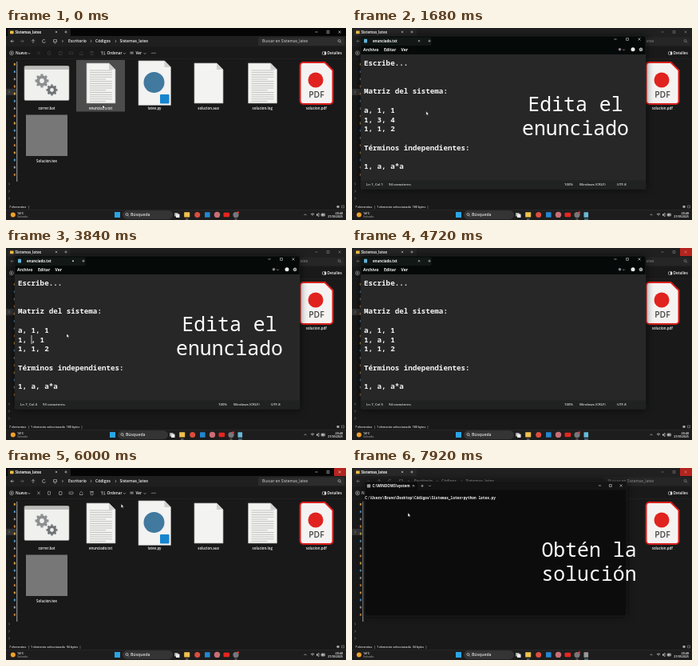
Recreate the animation shown at these times as an HTML page with a canvas. Size 426 by 240 pixels, loop 8000 ms.

```html
<!DOCTYPE html>
<html lang="es">
<head>
<meta charset="utf-8">
<title>Sistemas_latex</title>
<style>
html, body { margin: 0; width: 100%; height: 100%; overflow: hidden; background: #191919; }
canvas { display: block; width: 100vw; height: 100vh; }
</style>
</head>
<body>
<canvas id="stage"></canvas>
<script>
const W = 426, H = 240, LOOP = 8000;
const UI = '"Open Sans", "Noto Sans", sans-serif';
const MONO = '"Noto Sans Mono", "DejaVu Sans Mono", monospace';
const canvas = document.getElementById('stage');
const c = canvas.getContext('2d');

// time, line being edited, caret column
const EDITS = [
  [0, '1, 3, 4', 0], [2150, '1, 3, 4', 8], [2600, '1, 3, ', 7],
  [3000, '1, 3, 1', 8], [3160, '1, 3, 1', 7], [3280, '1, 3, 1', 6],
  [3400, '1, 3, 1', 5], [3600, '1, , 1', 4], [3850, '1, a, 1', 5]
];
// time, x, y of the pointer
const POINTER = [
  [0, 121, 96], [750, 121, 96], [1080, 104, 102], [1400, 104, 102],
  [2050, 76, 107], [4150, 76, 107], [4600, 428, 2], [5400, 428, 2],
  [6250, 70, 56], [8000, 70, 56]
];

const clamp = v => Math.max(0, Math.min(1, v));
const ramp = (t, a, b) => clamp((t - a) / (b - a));
const ease = p => p * p * (3 - 2 * p);

function rect(x, y, w, h, fill, r = 0) {
  c.fillStyle = fill;
  c.beginPath();
  r ? c.roundRect(x, y, w, h, r) : c.rect(x, y, w, h);
  c.fill();
}
function disc(x, y, r, fill) {
  c.fillStyle = fill;
  c.beginPath();
  c.arc(x, y, r, 0, 7);
  c.fill();
}
function shape(points, fill) {
  c.fillStyle = fill;
  c.beginPath();
  points.forEach(p => c.lineTo(...p));
  c.closePath();
  c.fill();
}
function line(points, color = '#ddd', width = .6) {
  c.strokeStyle = color;
  c.lineWidth = width;
  c.beginPath();
  points.forEach(p => c.lineTo(...p));
  c.stroke();
}
function frame(x, y, w, h, color, width = .6, r = 0) {
  c.strokeStyle = color;
  c.lineWidth = width;
  c.beginPath();
  c.roundRect(x, y, w, h, r);
  c.stroke();
}
// y is the vertical middle of the lower-case letters
function text(s, x, y, size = 5, o = {}) {
  c.font = `${o.weight || 600} ${size}px ${o.font || UI}`;
  c.textAlign = o.align || 'left';
  c.fillStyle = o.color || '#f4f4f4';
  c.fillText(s, x, y + size * .3);
}
function faded(alpha, draw) {
  if (alpha <= 0) return;
  c.save();
  c.globalAlpha *= alpha;
  draw();
  c.restore();
}
const cross = (x, y, r = 1.5, color) => {
  line([[x - r, y - r], [x + r, y + r]], color);
  line([[x + r, y - r], [x - r, y + r]], color);
};
const plus = (x, y, r = 1.6, color) => {
  line([[x - r, y], [x + r, y]], color);
  line([[x, y - r], [x, y + r]], color);
};
const chevron = (x, y, color) => line([[x - .8, y - 1.3], [x + .7, y], [x - .8, y + 1.3]], color);
const down = (x, y, color) => line([[x - 1.3, y - .6], [x, y + .7], [x + 1.3, y - .6]], color);
const controls = (x, y, step) => {
  line([[x - 1.6, y], [x + 1.6, y]]);
  frame(x + step - 1.4, y - 1.4, 2.8, 2.8, '#ddd');
  cross(x + 2 * step, y);
};

function page(x, y, w, h, rows) {
  const f = 8;
  const outline = [[x, y], [x + w - f, y], [x + w, y + f], [x + w, y + h], [x, y + h]];
  shape(outline, '#f3f3f1');
  line([...outline, [x, y]], '#a9a9a9', .7);
  shape([[x + w - f, y], [x + w - f, y + f], [x + w, y + f]], '#cfcfcf');
  for (let i = 0; i < rows; i++) {
    const ly = y + 9 + i * 2.75;
    line([[x + 4, ly], [x + w - (i % 5 === 4 ? 12 : 4), ly]], '#bdbdbd', .9);
  }
}
function gear(x, y, r, color) {
  for (let i = 0; i < 8; i++) {
    const a = i * Math.PI / 4, dx = Math.cos(a), dy = Math.sin(a);
    line([[x + dx * r * .7, y + dy * r * .7], [x + dx * r, y + dy * r]], color, r * .36);
  }
  c.beginPath();
  c.lineWidth = r * .46;
  c.arc(x, y, r * .57, 0, 7);
  c.stroke();
}
function pdf(x, y, w, h) {
  const f = 10, r = 4;
  c.beginPath();
  c.moveTo(x + r, y);
  c.lineTo(x + w - f, y);
  c.lineTo(x + w, y + f);
  c.arcTo(x + w, y + h, x, y + h, r);
  c.arcTo(x, y + h, x, y, r);
  c.arcTo(x, y, x + w, y, r);
  c.closePath();
  c.fillStyle = '#f5f3f2';
  c.strokeStyle = '#d81f1b';
  c.lineWidth = 2;
  c.fill();
  c.stroke();
  disc(x + 19.5, y + 22, 9.5, '#e0231e');
  text('PDF', x + 20.5, y + 40.5, 10.4, { align: 'center', color: '#444' });
}

function files(t) {
  if (t < 5900) rect(88, 40, 61, 64.5, t < 800 ? '#4c4c4c' : '#343434');
  if (t >= 6150) rect(21, 40, 60.5, 64.5, t < 6900 ? '#3b3b3b' : '#343434');

  rect(23, 47.5, 56, 43, '#f0f0ee', 1.5);
  rect(23, 47.5, 56, 4.5, '#bcbcba', 1.5);
  frame(23, 47.5, 56, 43, '#999', .7, 1.5);
  gear(45, 66, 8.5, '#8d8f91');
  gear(57.5, 77.5, 7, '#707376');

  page(101, 44, 36, 50, 15);
  page(166, 41, 40.5, 55.5, 0);
  disc(185.5, 68, 13, '#41799f');
  rect(193, 83, 11.5, 11.5, '#1685cf', 1);
  page(236, 44, 36, 50, 0);
  page(303.5, 44, 36, 50, 15);
  pdf(368.5, 43, 41, 52);
  rect(25, 108.5, 52, 51.5, '#777');

  ['correr.bat', 'enunciado.txt', 'latex.py', 'solucion.aux', 'solucion.log', 'solucion.pdf']
    .forEach((s, i) => text(s, 51 + i * 67.55, 100.5, 4.4, { align: 'center' }));
  text('Solucion.tex', 51, 166.5, 4.4, { align: 'center' });
}

function explorer(t) {
  const active = t < 1000 || (t > 5050 && t < 7150);
  const picked = t >= 800;
  rect(0, 0, W, H, '#191919');
  rect(0, 0, W, 10, active ? '#050505' : '#202020');
  rect(2, 1, 79, 9, active ? '#1f1f1f' : '#282828', 1.5);
  rect(0, 10, W, 13.5, '#1f1f1f');
  rect(5, 3.4, 4.6, 3.8, '#efbd45', .5);
  text('Sistemas_latex', 11.6, 5.3, 4.4, { weight: 700 });
  cross(63, 5, 1.2);
  plus(75, 5);
  if (t >= 4550) rect(411, 0, 15, 10, '#b5231f');
  faded(active ? 1 : .55, () => controls(389, 5, 14.5));

  faded(active ? 1 : .6, () => {
    line([[10, 16.5], [6, 16.5], [8, 14.5]]);
    line([[6, 16.5], [8, 18.5]]);
    line([[18, 16.5], [22, 16.5], [20, 14.5]], '#777');
    line([[22, 16.5], [20, 18.5]], '#777');
    line([[34, 19], [34, 14.5], [32, 16.5]]);
    line([[34, 14.5], [36, 16.5]]);
    c.beginPath();
    c.arc(47.5, 16.5, 2, .3, 5.6);
    c.stroke();
    frame(59.5, 14.7, 4, 2.8, '#ddd');
    line([[60.5, 19], [62.5, 19]]);
    [71, 106.5, 137.5].forEach(x => chevron(x, 16.5));
    text('Escritorio', 78, 16.5);
    text('Códigos', 112, 16.5);
    text('Sistemas_latex', 142.5, 16.5);
    rect(316, 11.5, 108, 10.5, '#2c2c2c', 1.5);
    text('Buscar en Sistemas_latex', 321, 16.5, 4.9, { color: '#ddd', weight: 500 });
    c.strokeStyle = '#ccc';
    c.lineWidth = .6;
    c.beginPath();
    c.arc(417.5, 16, 1.5, 0, 7);
    c.stroke();
    line([[418.5, 17], [420, 18.5]], '#ccc');
  });

  frame(4.5, 28.8, 5, 5, '#ccc', .6, 2.5);
  plus(7, 31.3, 1.3);
  text('Nuevo', 12, 31.8, 4.7);
  down(29, 31.8);
  faded(picked ? .85 : .22, () => {
    cross(41, 31.3, 1.8);
    frame(52.5, 29.3, 3, 4, '#ddd', .6, .5);
    frame(66.5, 29.5, 3.5, 4, '#ddd', .6, .5);
    frame(79, 30, 5, 2.6, '#ddd', .6, .5);
    line([[92.5, 31.5], [92.5, 33.5], [96, 33.5], [96, 31.5]]);
    line([[92.5, 31], [94.3, 29.3], [96, 31]]);
    frame(106, 30, 3, 3.6, '#ddd', .6, .5);
    line([[105, 29.6], [110, 29.6]]);
  });
  line([[120.5, 33.5], [120.5, 29], [119, 30.5]]);
  line([[123, 29], [123, 33.5], [124.5, 32]]);
  text('Ordenar', 126.5, 31.8, 4.7);
  down(148.5, 31.8);
  rect(155.5, 29.8, 4.2, .7, '#ddd');
  rect(155.5, 31.6, 4.2, .7, '#ddd');
  text('Ver', 162.5, 31.8, 4.7);
  down(174, 31.8);
  [183, 185, 187].forEach(x => disc(x, 31.3, .55, '#ddd'));
  frame(396.5, 29.8, 4.5, 3.4, '#ddd', .6, .5);
  rect(399, 29.8, 2, 3.4, '#ddd');
  text('Detalles', 402.5, 31.8, 4.7);
  rect(0, 38.5, W, .5, '#2b2b2b');

  rect(0, 76, 13, 8, '#343434');
  const dots = ['#d8a640', '#4b96c8', '#999', '#c98138'];
  for (let i = 0; i < 16; i++) rect(9.8, 44 + i * 9.2, 2, 2.8, dots[i % 4], .5);
  [80, 195, 204, 213].forEach(y => chevron(4, y, '#888'));
  rect(13, 42, 1.3, 150, '#858585');

  files(t);

  const bytes = t >= 6900 ? '34' : t >= 5050 ? '94' : '180';
  text('7 elementos  |' + (picked ? `  1 elemento seleccionado  ${bytes} bytes  |` : ''),
    4, 223.5, 3.6, { color: '#ddd' });
  rect(414.5, 222, 3, 2.8, '#aaa');
  frame(420.5, 222, 3, 2.8, '#aaa', .5);
}

function taskbar(t) {
  const shift = 6 * (ease(ramp(t, 980, 1130)) - ease(ramp(t, 5300, 5480)) + ease(ramp(t, 7180, 7350)));
  rect(0, 227.5, W, 12.5, '#1d1d1d');
  rect(0, 227.3, W, .4, '#333');
  disc(8.8, 233.5, 3, '#f0a02c');
  text('14°C', 14, 231.5, 3.8);
  text('Soleado', 14, 236, 3.6, { color: '#aaa', weight: 400 });

  c.save();
  c.translate(-shift, 0);
  rect(136, 230, 7, 7, '#2aa5e6');
  rect(146.5, 228.7, 62, 9.8, '#343434', 4.9);
  frame(146.5, 228.7, 62, 9.8, '#4a4a4a', .4, 4.9);
  c.strokeStyle = '#ddd';
  c.lineWidth = .7;
  c.beginPath();
  c.arc(151.5, 233, 1.5, 0, 7);
  c.stroke();
  line([[152.6, 234.2], [154, 235.6]], '#ddd', .7);
  text('Búsqueda', 156, 233.5, 5.1, { color: '#ddd' });
  rect(211, 231, 4.5, 4.5, '#aaa', .6);
  rect(213, 232.5, 4.5, 4.5, '#eee', .6);
  rect(223.2, 230.2, 7, 6.4, '#f1c24c', .6);
  disc(239.7, 233.4, 3.5, '#dd4d3d');
  rect(249, 230.2, 6.6, 6.6, '#2386d1', .6);
  disc(264.5, 233.4, 3.7, '#c96d76');
  rect(272.5, 230.8, 7.6, 5.4, '#e52620', 1.2);
  disc(288, 233.6, 3.6, '#77777b');
  disc(290.7, 230.6, 1.3, '#e33');
  rect(225, 238.6, 3.5, .8, '#a9a9a9');
  rect(286.5, 238.6, 3, .8, '#999');
  c.restore();

  const note = t >= 1050 && t < 5150, shell = t >= 7250;
  if (note || shell) {
    rect(290.5, 230.2, 5.6, 6.6, note ? '#69b8d9' : '#999', .6);
    rect(291, 238.6, 5, .8, '#6cc4f0');
  }

  line([[373.5, 234.2], [375, 232.6], [376.5, 234.2]]);
  c.lineWidth = .7;
  [1.4, 3].forEach(r => {
    c.beginPath();
    c.arc(384, 235, r, -2.4, -.75);
    c.stroke();
  });
  rect(389, 232.5, 1.6, 2, '#ddd');
  line([[390.5, 232.5], [392, 231.3], [392, 235.7], [390.5, 234.5]]);
  frame(395, 232, 4.5, 3, '#ddd', .6, .5);
  rect(395.5, 232.5, 3, 2, '#ddd');
  text('20:48', 422, 231.5, 3.7, { align: 'right' });
  text('27/05/2025', 422, 236, 3.5, { align: 'right' });
}

function shadow(x, y, w, h, fill) {
  c.save();
  c.shadowColor = 'rgba(0,0,0,.7)';
  c.shadowBlur = 10 * canvas.width / W;
  rect(x, y, w, h, fill, 2);
  c.restore();
  frame(x, y, w, h, '#333', .4, 2);
}

// a window grows slightly while it fades in
function popup(show, cx, cy, draw) {
  faded(show, () => {
    const k = .925 + .075 * show;
    c.translate(cx, cy);
    c.scale(k, k);
    c.translate(-cx, -cy);
    draw();
  });
}

function notepad(t) {
  shadow(11, 10, 357, 191.5, '#050a09');
  rect(11, 33, 357, 158, '#272727');
  rect(15, 13.8, 4, 4.6, '#62b3d6', .5);
  controls(330, 14, 15);
  if (t < 1280) return;

  const [at, row, col] = EDITS.filter(e => e[0] <= t).pop();
  rect(11.5, 11.5, 88, 10.5, '#111816', 1.5);
  rect(15, 13.8, 4, 4.6, '#62b3d6', .5);
  text('enunciado.txt', 26, 16.3, 4.4, { weight: 700 });
  t >= 2600 && t < 4250 ? disc(84, 16.2, 1, '#ddd') : cross(84, 16.2, 1.2);
  plus(97, 16.2);
  [['Archivo', 14], ['Editar', 40], ['Ver', 61.5]].forEach(([s, x]) => text(s, x, 27.5, 5.1, { weight: 700 }));
  disc(335.5, 26.8, 1.8, '#8f8090');
  down(340.5, 27.2);
  disc(352, 26.8, 2.5, '#eee');
  gear(362, 26.8, 2.4, '#ddd');

  const pitch = 11.75, step = 5.53;
  const lines = ['Escribe...', '', '', 'Matriz del sistema:', '', 'a, 1, 1', row, '1, 1, 2',
    '', 'Términos independientes:', '', '1, a, a*a'];
  lines.forEach((s, i) => text(s, 15, 44.3 + i * pitch, step / .6, { font: MONO, weight: 600 }));
  if (col && (t - at) % 1060 < 530) rect(15 + (col - 1) * step, 109, .8, 11, '#eee');

  rect(11, 190.5, 357, 11, '#202121', 1.5);
  [[col ? `Ln 7, Col ${col}` : 'Ln 1, Col 1', 18], [`${87 + row.length} caracteres.`, 46],
    ['100%', 266], ['Windows (CRLF)', 285], ['UTF-8', 332]]
    .forEach(([s, x]) => text(s, x, 196, 4.3, { color: '#ddd' }));
}

function terminal(t) {
  shadow(16, 17, 328, 168, '#0c0c0c');
  rect(16, 17, 328, 10.5, '#141414', 2);
  controls(310.5, 22, 13.3);
  rect(18.8, 20.2, 4.4, 4.4, '#999', .5);
  if (t < 7320) return;
  rect(17, 18, 65, 9.5, '#0c0c0c', 1.5);
  rect(18.8, 20.2, 4.4, 4.4, '#999', .5);
  text('C:\\WINDOWS\\system', 25.5, 22.3, 4.5, { weight: 700 });
  cross(77, 22.3, 1.2);
  plus(88, 22.3);
  down(97.5, 22.3);
  text('C:\\Users\\Bruno\\Desktop\\Códigos\\Sistemas_latex>python latex.py', 16.3, 37.3, 4.48,
    { font: MONO, weight: 600 });
}

function caption(alpha, x, y, rows) {
  faded(alpha, () => rows.forEach((s, i) =>
    text(s, x, y + i * 29.7, 24.8, { font: MONO, weight: 500, align: 'center', color: '#fff' })));
}

function pointer(t) {
  const i = Math.max(1, POINTER.findIndex(p => p[0] > t));
  const a = POINTER[i - 1], b = POINTER[i];
  const p = ease(ramp(t, a[0], b[0]));
  const x = a[1] + (b[1] - a[1]) * p, y = a[2] + (b[2] - a[2]) * p;
  shape([[0, 0], [0, 5], [1.2, 4], [2, 5.6], [2.8, 5.2], [2.1, 3.7], [3.5, 3.6]]
    .map(([dx, dy]) => [x + dx, y + dy]), '#fff');
  c.strokeStyle = '#111';
  c.lineWidth = .5;
  c.stroke();
}

function draw(t) {
  const k = window.devicePixelRatio || 1;
  const w = Math.round(innerWidth * k), h = Math.round(innerHeight * k);
  if (canvas.width !== w || canvas.height !== h) {
    canvas.width = w;
    canvas.height = h;
  }
  c.setTransform(w / W, 0, 0, h / H, 0, 0);
  explorer(t);
  const note = ease(ramp(t, 960, 1150)) * (1 - ease(ramp(t, 4960, 5140)));
  popup(note, 189, 105, () => notepad(t));
  popup(ramp(t, 7095, 7280), 180, 101, () => terminal(t));
  taskbar(t);
  caption(ramp(t, 1050, 1560) * (1 - ramp(t, 3900, 4450)), 280, 96.5, ['Edita el', 'enunciado']);
  caption(ramp(t, 7280, 7860), 297, 103.5, ['Obtén la', 'solución']);
  pointer(t);
}

const start = performance.now();
function tick() {
  draw((performance.now() - start) % LOOP);
  requestAnimationFrame(tick);
}
tick();
</script>
</body>
</html>
```
